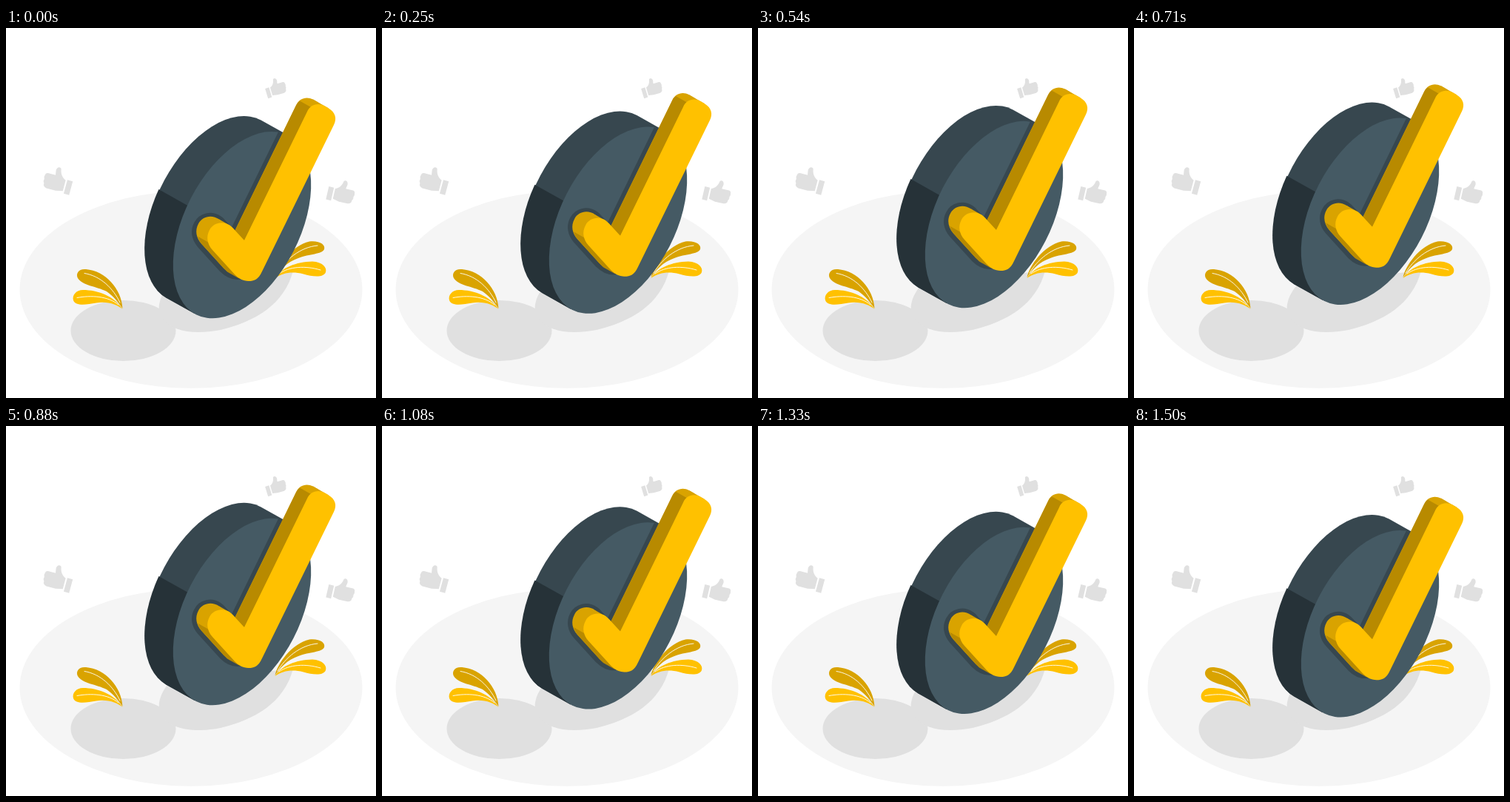
An HTML page that plays this animation: 500x500 px, repeating every 1.54 s.

```html
<!DOCTYPE html>
<html lang="en">
<head>
<meta charset="utf-8">
<title>Floating check mark</title>
<style>
  html, body { margin: 0; width: 100%; height: 100%; overflow: hidden; background: #fff; }
  svg { display: block; width: 100%; height: 100%; }
  .gray { fill: #e0e0e0; }
  .gold { fill: #d9a300; }
  .yellow { fill: #ffc100; }
  .shade { fill: #b88a00; }
  .rim { fill: #37474f; }
  .vein { fill: none; stroke: #fff; stroke-width: .9; stroke-linecap: round; }
</style>
</head>
<body>
<svg viewBox="0 0 500 500">
  <defs>
    <g id="thumb">
      <path d="M-18-4h7v18h-7z"/>
      <path d="M-9-3C-4-5-1-9 0-15C1-18 6-17 6-12L5-6H14Q18-6 18-2.5Q19 0 17.5 2.5Q18.5 5 16.5 7.5Q17 12 12 13H0L-9 11Z"/>
    </g>
    <ellipse id="face" rx="78.1" ry="136.1" transform="translate(319 266) rotate(27.2)"/>
    <clipPath id="faceClip"><use href="#face"/></clipPath>
    <path id="check" d="M322 287L407 113C411 103.5 421 100.5 430 105L436 108.5C445 114 447.5 122 443 131L346 329C341 340 335 342 328 342C320 342 314 338 309 333L279 300C272 292 270 282 275 273C280 263 293 260 303 267C306 269 308 272 310 274Z"/>
  </defs>

  <ellipse cx="250" cy="353.5" rx="231.5" ry="133.3" fill="#f5f5f5"/>
  <g class="gray">
    <ellipse cx="158.5" cy="409" rx="71" ry="41"/>
    <path d="M222 345C205 365 203 382 212 393C224 410 254 415 290 408C336 397 376 374 388 328Z"/>
    <use href="#thumb" transform="translate(364.3 80.8) rotate(-17) scale(.77)"/>
    <use href="#thumb" transform="translate(70.5 206.3) rotate(15) scale(-1.07 1.07)"/>
    <use href="#thumb" transform="translate(453 222) rotate(13)"/>
  </g>

  <!-- leaves -->
  <path class="gold" d="M157.5 379C156 352 134 328 108 326C98 325 94 332 97 338C103 348 122 349 136 356C146 363 152 371 157.5 379Z"/>
  <path class="yellow" d="M157.5 380C146 362 124 354 104 354C95 354 89 361 91 368C94 376 108 374 122 371.5C138 369 150 374 157.5 380Z"/>
  <path class="vein" d="M106 331.5C128 335 145 352 154 371M96 364.5C115 361 138 362 152 374"/>
  <path class="gold" d="M363.5 337C367 321 386 294 410 288.5C424 287 432 293 430 299C427 306 410 305 395 311C380 316 370 327 363.5 337Z"/>
  <path class="yellow" d="M363.5 338C372 324 392 316 414 315.5C428 316 434 324 432 330C429 338 414 336 402 332.5C386 328.5 374 331 363.5 338Z"/>
  <path class="vein" d="M421 294C397 296 377 314 367 331M425 327C405 321 383 322 369 332"/>

  <g id="badge">
    <!-- disc -->
    <path class="rim" d="M254.9 386L216.3 364.4A78.1 136.1 27.2 0 1 344.5 124.4L383.1 146Z"/>
    <path fill="#263238" d="M254.9 386L216.3 364.4A78.1 136.1 27.2 0 1 206.4 218L245 239.6Z"/>
    <use href="#face" fill="#455a64"/>
    <g clip-path="url(#faceClip)">
      <use href="#check" class="rim" x="-15.5" y="-7.8" stroke="#37474f" stroke-width="11.4" stroke-linejoin="round"/>
    </g>
    <!-- check mark -->
    <use href="#check" class="gold" x="-15" y="-8.5"/>
    <path class="gold" d="M415 96.5L436 108.5L420 120L400 110ZM288 258.5L303 267L290 290L265 275Z"/>
    <path class="shade" d="M307 278.5L392 104.5Q394 100.5 397 98.4L412 106.9L409 111L322 287Z"/>
    <path class="shade" d="M259 281.5Q261 288 264 291.5L294 324.5Q297 327.5 299 329.5L314 338L328 342L300 300L274 290Z"/>
    <use href="#check" class="yellow"/>
  </g>
</svg>
<script>
  const LOOP = 1540, STEPS = 37, RISE = 20;
  const badge = document.getElementById('badge');

  // The badge rises and sinks at constant speed, in 24 steps per second.
  function draw(now) {
    const step = Math.floor((now % LOOP + 3) * 0.024) % STEPS;
    const phase = (step + 1) / STEPS % 1;
    const height = RISE * (1 - Math.abs(1 - 2 * phase));
    badge.setAttribute('transform', `translate(0 ${1.2 - height})`);
  }

  function tick(now) {
    draw(now);
    requestAnimationFrame(tick);
  }
  draw(0);
  requestAnimationFrame(tick);
</script>
</body>
</html>
```
